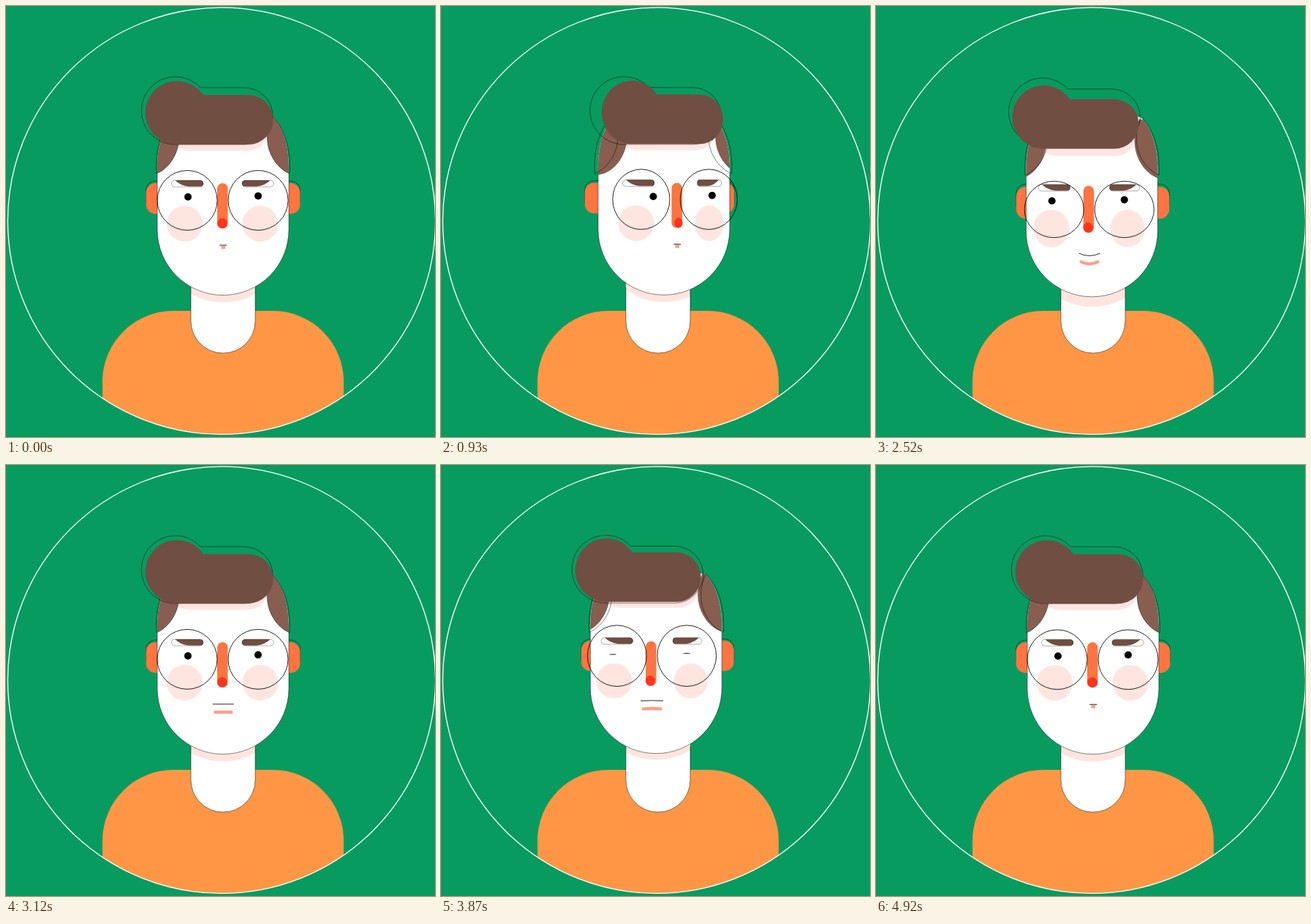
These frames come from a looping animation (587 px wide and 591 px high, 4950 ms). An HTML page:

```html
<!DOCTYPE html>
<html lang="en">
<head>
<meta charset="utf-8">
<title>Portrait</title>
<style>
html, body { margin: 0; width: 100%; height: 100%; overflow: hidden; background: #089b60; }
svg { display: block; --yaw: 0; --turn: 0; --pitch: 0; --open: 1; }

/* Parallax: x and y are a part's travel per unit of yaw and pitch,
   squash narrows it as the head turns, tall stretches it as the head tilts. */
.part {
  --x: 0; --y: 0; --squash: 0; --tall: 0;
  transform-box: fill-box;
  transform-origin: center;
  transform:
    translate(calc(var(--x) * var(--yaw) * 1px), calc(var(--y) * var(--pitch) * 1px))
    scale(calc(1 - var(--squash) * var(--turn)), calc(1 + var(--tall) * var(--pitch)));
}
.face { --x: 8; --y: 6.5; }
.line { fill: none; stroke: #000; stroke-opacity: .6; stroke-width: .8; vector-effect: non-scaling-stroke; }
.rim { stroke-opacity: .85; stroke-width: 1; }
.soft { stroke-opacity: .4; }
.skin { fill: #fff; }
.ear { fill: #ff7440; }
.pink { fill: #ffe5e0; }
.hair { fill: #714e42; }
.eye { rx: 5px; ry: calc(5px * var(--open)); }
</style>
</head>
<body>
<svg id="stage" width="587" height="591" viewBox="0 0 587 591">
  <defs>
    <path id="head" d="M207 230C206 195 213 168 230 150H364C381 168 388 195 387 230V306.5A90 90 0 0 1 207 306.5Z"/>
    <path id="neck" d="M253 330H341V432A44 44 0 0 1 253 432Z"/>
    <path id="leaf" d="M364 150C381 168 390 195 388 230C368 222 346 190 364 150Z"/>
    <path id="temple" d="M420 238L388 230C368 222 346 190 364 150H420Z"/>
    <path id="brow" d="M231.5 239H266A4.25 4.25 0 0 1 266 247.5H250Q238 246 231.5 239Z"/>
    <clipPath id="disc"><circle cx="295" cy="294.8" r="292.6"/></clipPath>
    <clipPath id="neckClip"><use href="#neck"/></clipPath>
    <clipPath id="headClip"><use class="part face" href="#head"/></clipPath>
  </defs>

  <rect x="132" y="418" width="330" height="260" rx="97" fill="#ff9645" clip-path="url(#disc)"/>
  <circle cx="295" cy="294.8" r="292.6" fill="none" stroke="#fff" stroke-width="1.3"/>

  <use class="skin" href="#neck"/>
  <g clip-path="url(#neckClip)">
    <path class="part pink" style="--x:8;--y:17" d="M207 300H387V316.5A90 90 0 0 1 207 316.5Z"/>
  </g>
  <path class="line" d="M253 386V432A44 44 0 0 0 341 432V386"/>

  <g class="part" style="--x:2;--y:12;--squash:.03">
    <rect class="line" x="191.5" y="240" width="40" height="42" rx="13"/>
    <rect class="line" x="362.5" y="240" width="40" height="42" rx="13"/>
  </g>
  <g class="part ear" style="--x:2;--y:16.5;--squash:.03;--tall:.12">
    <rect x="191.5" y="243" width="40" height="42" rx="13"/>
    <rect x="362.5" y="243" width="40" height="42" rx="13"/>
  </g>

  <g class="part face">
    <use class="skin" href="#head"/>
    <path class="line" d="M207 230V306.5A90 90 0 0 0 387 306.5V230"/>
  </g>
  <g clip-path="url(#headClip)">
    <rect class="part pink" style="--x:18;--y:20.5" x="222" y="140" width="137" height="58.5" rx="28"/>
    <g class="part" style="--x:18;--y:16" fill="#885e50">
      <use href="#temple"/>
      <use href="#temple" transform="matrix(-1 0 0 1 594 0)"/>
    </g>
  </g>

  <circle class="part pink" style="--x:22.5;--y:18.5;--tall:.14" cx="244.5" cy="298.5" r="24.5"/>
  <circle class="part pink" style="--x:19;--y:18.5;--tall:.14;--squash:.18" cx="348" cy="298.5" r="24.5"/>

  <g class="part" style="--x:7;--y:5.5;--squash:-.03">
    <use class="line" href="#leaf"/>
    <use class="line" href="#leaf" transform="matrix(-1 0 0 1 594 0)"/>
  </g>
  <path class="part line" style="--x:18.5;--y:5" d="M266 112H326A39 39 0 0 1 326 190H232A46.5 46.5 0 1 1 266 112Z"/>
  <path class="part hair" style="--x:25;--y:16.7;--squash:.05" d="M270 122H331.5A34 34 0 0 1 331.5 190H234A43.5 43.5 0 1 1 270 122Z"/>

  <g class="part" style="--x:22;--y:16.5">
    <use class="hair" href="#brow"/>
    <rect class="line soft" x="226.5" y="239" width="43" height="9" rx="4.5"/>
  </g>
  <g class="part" style="--x:22.5;--y:16.5;--squash:.24">
    <use class="hair" href="#brow" transform="matrix(-1 0 0 1 593 0)"/>
    <rect class="line soft" x="323.3" y="239" width="43" height="9" rx="4.5"/>
  </g>

  <ellipse class="part eye" style="--x:41.5;--y:15.5" cx="249" cy="261.8"/>
  <ellipse class="part eye" style="--x:26;--y:15.5" cx="345" cy="260.4"/>

  <rect class="part ear" style="--x:26.5;--y:13.5;--tall:.11" x="289" y="243" width="14.5" height="62" rx="7.2"/>
  <circle class="part" style="--x:29;--y:16.5;--squash:.2" fill="#ff331f" cx="296" cy="298" r="7"/>

  <g class="part" style="--x:23.7;--y:35.5;--squash:.047;--tall:-.16">
    <circle class="line rim" cx="248" cy="266.5" r="41"/>
    <circle class="line rim" cx="345" cy="266.5" r="41"/>
  </g>

  <g class="part" style="--x:26;--y:34.5">
    <path id="lip" fill="none" stroke="#ff9e85" stroke-width="4.2"/>
    <path id="mouth" class="line rim"/>
  </g>
</svg>
<script>
const LOOP = 4950, BLINKS = [480, 1740, 3870], BLINK_HALF = 120;

// A pose is yaw, pitch, mouth width and smile.
const rest = [0, 0, 0, 0];
const right = [1.06, -.04, 0, 0];
const rebound = [-.1, 0, 0, 0];
const grin = [0, 0, 1, 3.5];
const pleased = [-.2, .35, 1, 3.5];
const calm = [0, 0, 1, 0];
const upLeft = [-.5, -.65, 1, 0];
const gloomy = [.03, 1, 1.3, -2];
const moves = [
  [0, rest], [540, right], [900, right], [1110, rebound], [1230, rest], [1530, rest],
  [1740, grin], [2040, pleased], [2520, pleased], [3060, calm], [3100, calm],
  [3600, upLeft], [3690, upLeft], [4170, gloomy], [4470, gloomy], [LOOP, rest]
];

const $ = id => document.getElementById(id);

function poseAt(t) {
  const i = moves.findIndex(m => m[0] > t);
  const [t0, a] = moves[i - 1], [t1, b] = moves[i];
  const ease = (1 - Math.cos(Math.PI * (t - t0) / (t1 - t0))) / 2;
  return a.map((n, k) => n + (b[k] - n) * ease);
}

function eyesOpen(t) {
  const gap = Math.min(...BLINKS.map(b => Math.abs(t - b)));
  return Math.max(.1, Math.min(1, gap / BLINK_HALF));
}

function curve(id, y, half, bend) {
  const end = y - bend * .3;
  $(id).setAttribute('d', `M${297.3 - half} ${end}q${half} ${bend * 2} ${half * 2} 0`);
}

function draw(t) {
  const [yaw, pitch, wide, smile] = poseAt(t);
  const vars = { yaw, pitch, turn: Math.abs(yaw), open: eyesOpen(t) };
  for (const name in vars) $('stage').style.setProperty('--' + name, vars[name].toFixed(4));
  curve('mouth', 328, 5 + 9.5 * wide, smile);
  curve('lip', 331 + 8 * Math.min(wide, 1), 2.8 + 10 * wide, smile);
}

const start = performance.now();
function tick() {
  draw((performance.now() - start) % LOOP);
  requestAnimationFrame(tick);
}
tick();
</script>
</body>
</html>
```
